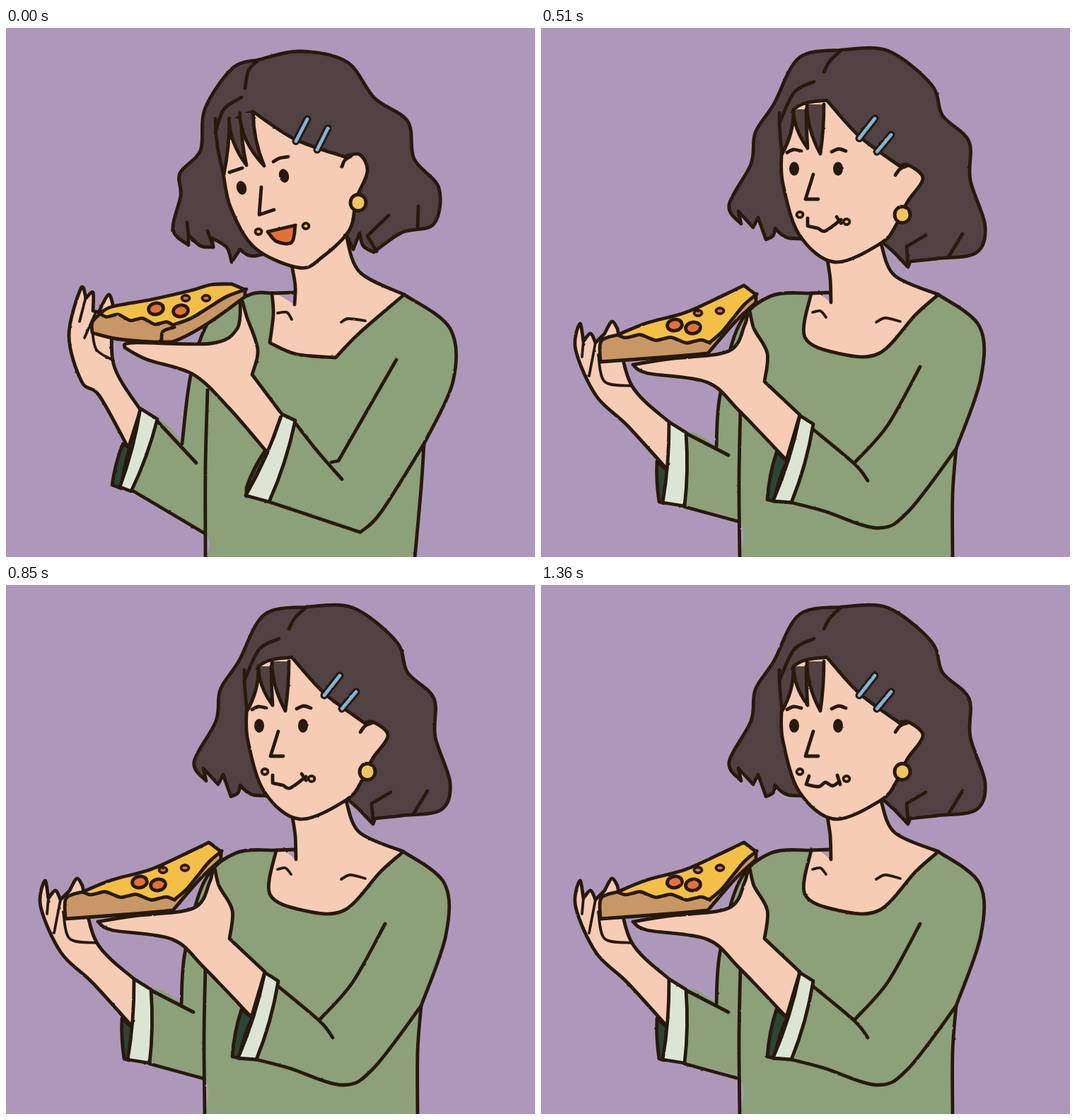
Recreate the animation shown at these times as an HTML page. Size 748 by 748 pixels, loop 1.53 s.

```html
<!DOCTYPE html>
<html lang="en">
<head>
<meta charset="utf-8">
<title>Pizza break</title>
<style>
  html, body { margin: 0; width: 100%; height: 100%; overflow: hidden; background: #ad98bb; }
  svg { display: block; width: 100vw; height: 100vh; }
  path, ellipse { fill: none; stroke: #27190c; stroke-width: 4.8; stroke-linecap: round; stroke-linejoin: round; }
  .bare { stroke: none; }
  .thin { stroke-width: 3.8; }
  .skin { fill: #f7ccb5; }
  .hair { fill: #514142; }
  .shirt { fill: #8ca07a; }
  .cuff { fill: #dce5d3; }
  .inside { fill: #2d4435; }
  .cheese { fill: #f3bf47; }
  .crust { fill: #c99766; }
  .meat { fill: #e4703b; }
  .gold { fill: #f2c460; }
  .eye { fill: #27190c; stroke: none; }
  .clip { stroke-width: 11; }
  .blue { stroke: #7fb5dc; stroke-width: 4.8; }
</style>
</head>
<body>
<svg viewBox="0 0 748 748" id="stage"><defs id="defs"></defs></svg>
<script>
const NS = 'http://www.w3.org/2000/svg';
const stage = document.getElementById('stage');
const defs = document.getElementById('defs');
const LOOP = 1530, BEATS = 9;

function add(parent, tag, attrs) {
  const node = document.createElementNS(NS, tag);
  for (const key in attrs) node.setAttribute(key, attrs[key]);
  return parent.appendChild(node);
}

// Smooth curve through points; "/" marks a corner.
function curve(text) {
  const runs = text.split('/').map(run => run.trim().split(/\s+/).map(p => p.split(',').map(Number)));
  let d = 'M' + runs[0][0], last = null;
  for (const run of runs) {
    const pts = last ? [last, ...run] : run;
    for (let i = 0; i + 1 < pts.length; i++) {
      const a = pts[i - 1] || pts[i], b = pts[i], c = pts[i + 1], e = pts[i + 2] || c;
      const out = b.map((v, k) => v + (c[k] - a[k]) / 6);
      const into = c.map((v, k) => v - (e[k] - b[k]) / 6);
      d += `C${out} ${into} ${c}`;
    }
    last = pts[pts.length - 1];
  }
  return d;
}

const reversed = pts => pts.split(' ').reverse().join(' ');
const shape = (g, cls, pts) => add(g, 'path', { class: cls, d: curve(pts) + 'Z' });
const lines = (g, list, cls = '') => list.forEach(pts => add(g, 'path', { class: cls, d: curve(pts) }));
const oval = (g, cls, [x, y], rx, ry = rx, turn = 0) =>
  add(g, 'ellipse', { class: cls, cx: x, cy: y, rx, ry, transform: `rotate(${turn} ${x} ${y})` });

// Rippling edge between two points.
function ripple([x1, y1], [x2, y2], bumps, size) {
  const steps = bumps * 4;
  return Array.from({ length: steps + 1 }, (_, i) => {
    const t = i / steps;
    return `${x1 + (x2 - x1) * t},${y1 + (y2 - y1) * t - size * Math.sin(t * bumps * 2 * Math.PI)}`;
  }).join(' ');
}

// Tapering lock of fringe hanging from (x, y) to its tip.
function lock(g, [x, y, width, tipX, tipY]) {
  const left = x - width / 2, right = x + width / 2, bend = (y + tipY) / 2;
  add(g, 'path', { class: 'hair', d: `M${left},${y}Q${left},${bend} ${tipX},${tipY}Q${right},${bend} ${right},${y}` });
}

// Band with bowed long sides, given its four corners clockwise.
function band(g, cls, [a, b, c, d], bow) {
  const side = (p, q) => `Q${(p[0] + q[0]) / 2 + bow},${(p[1] + q[1]) / 2 + bow / 2} ${q}`;
  add(g, 'path', { class: cls, d: `M${a}L${b}${side(b, c)}L${d}${side(d, a)}Z` });
}

// A group seen only on the beats marked 1.
function timed(parent, beats) {
  const name = 'b' + beats;
  if (!document.getElementById(name)) {
    const style = document.createElement('style');
    style.id = name;
    const stops = [...beats].map((on, i) => `${i * 100 / BEATS}%{opacity:${on}}`).join('');
    style.textContent = `@keyframes ${name}{${stops}100%{opacity:${beats[0]}}}`;
    document.head.append(style);
  }
  return add(parent, 'g', { style: `animation:${name} ${LOOP}ms step-end infinite` });
}

// Slightly ragged ink edges, with one seed per drawing.
function inked(beats, seed) {
  const f = add(defs, 'filter', {
    id: 'ink' + seed, filterUnits: 'userSpaceOnUse', x: 0, y: 0, width: 748, height: 760,
    'color-interpolation-filters': 'sRGB'
  });
  add(f, 'feTurbulence', { type: 'fractalNoise', baseFrequency: 0.2, seed, result: 'n' });
  add(f, 'feDisplacementMap', { in: 'SourceGraphic', in2: 'n', scale: 2, xChannelSelector: 'R', yChannelSelector: 'G' });
  return add(timed(stage, beats), 'g', { filter: `url(#ink${seed})` });
}

const leaning = {
  hair: '357,45 415,33 482,48 521,99 568,132 577,185 612,226 605,277 560,289 520,317 / 505,308 500,290 / 491,313 / 480,290 / 371,318 345,322 331,313 / 319,331 / 312,310 291,297 / 293,310 / 275,308 258,293 / 258,307 / 236,285 247,237 246,205 275,173 281,115 320,57 357,45',
  strands: ['256,275 258,293', '285,287 293,309', '541,265 511,294 / 524,316', '583,252 582,284', '357,45 343,60 338,85', '333,98 308,115 296,148'],
  neckL: '404,335 409,365 408,391',
  neckR: '481,293 500,345 563,377',
  neckline: '376,375 378,405 373,445 / 410,461 466,466 / 500,431 563,377',
  shoulderL: '249,588 262,487 290,410 345,377 376,375',
  shoulderR: '563,377 628,425 632,500 591,588',
  side: '591,588 587,650 578,750',
  elbow: '591,588 530,685 501,713 / 372,670',
  sleeveTop: '213,555 269,615',
  sleeveBottom: '177,653 280,714',
  folds: ['285,512 282,620 282,750', '552,469 470,612 / 460,614', '407,556 440,598 475,638'],
  collarbones: ['384,403 397,402 404,412', '474,416 484,411 508,414'],
  face: '349,118 408,157 478,182 / 500,179 511,203 495,242 486,285 447,324 415,339 352,311 318,255 307,205 / 318,138 349,118',
  locks: [[306, 128, 20, 308, 207], [324, 128, 17, 340, 194], [340, 120, 19, 365, 195]],
  features: ['316,204 334,198', '378,189 387,184 399,182', '361,225 358,264 / 379,257', '475,196 479,187 488,181'],
  clips: ['410,160 426,129', '440,172 455,142'],
  earring: [498, 247],
  eyes: [[333, 226], [393, 209]], tilt: -15,
  crumbs: [[357, 288], [424, 280]],
  backHand: '173,594 132,520 107,500 89,435 106,368 113,382 / 123,374 123,400 / 131,402 / 145,377 152,395 / 152,475 190,540',
  knuckles: ['113,380 104,415', '127,402 111,438', '122,428 128,455 152,470'],
  backCuff: [[190, 538], [214, 553], [177, 655], [161, 649]],
  backInside: [[165, 588], [175, 594], [163, 651], [150, 646]],
  frontHand: '168,452 180,445 290,446 327,425 332,385 341,410 356,455 348,490 / 390,546 / 370,601 / 315,537 265,490 200,469 168,452',
  frontCuff: [[390, 546], [409, 555], [372, 670], [339, 661]],
  frontInside: [[367, 597], [374, 604], [340, 662], [340, 650]],
  meats: [[212, 397], [247, 400], [254, 382], [283, 382]]
};

const upright = {
  hair: '425,31 490,32 552,80 568,124 605,160 607,215 628,280 615,318 560,326 522,330 / 519,338 / 500,318 / 480,300 / 368,298 345,295 331,283 / 328,294 318,299 / 307,268 / 300,282 / 279,259 / 283,277 / 266,250 297,192 303,148 329,108 365,42 425,31',
  strands: ['544,293 517,309 / 519,336', '596,291 576,324', '425,31 409,46 400,62', '386,76 358,91 337,135'],
  neckL: '405,328 409,355 410,388',
  neckR: '481,306 500,350 562,377',
  neckline: '382,375 373,437 420,460 478,460 530,405 562,377',
  shoulderL: '248,593 253,520 280,420 325,379 382,375',
  shoulderR: '562,377 620,422 622,495 587,595',
  side: '587,595 582,660 582,750',
  elbow: '587,595 520,683 476,707 400,683 354,671',
  sleeveTop: '205,573 265,604',
  sleeveBottom: '203,677 280,698',
  folds: ['282,538 280,640 281,750', '536,479 490,562 444,614', '383,566 443,616 462,640'],
  collarbones: ['384,402 395,400 403,409', '474,416 487,410 508,415'],
  face: '404,102 450,153 507,195 / 520,194 540,213 518,246 503,277 481,304 415,331 365,292 342,220 340,178 / 358,115 404,102',
  locks: [[347, 120, 20, 341, 178], [366, 115, 18, 377, 170], [388, 108, 24, 395, 178]],
  features: ['348,176 357,172 368,174', '411,175 421,171 431,174', '385,207 374,242 / 392,242', '501,208 508,199 518,195'],
  clips: ['450,156 472,128', '475,175 495,151'],
  earring: [511, 264],
  eyes: [[358, 199], [420, 199]], tilt: 0,
  crumbs: [[366, 264], [432, 274]],
  backHand: '180,626 122,562 78,520 49,455 55,418 60,443 / 70,432 77,445 / 90,432 / 100,415 108,425 / 128,505 182,558',
  knuckles: ['60,442 58,465', '77,445 68,492', '81,462 90,500 128,506'],
  backCuff: [[181, 557], [205, 572], [203, 676], [172, 671]],
  backInside: [[164, 613], [180, 627], [174, 672], [167, 670]],
  frontHand: '130,476 180,468 265,457 288,420 294,398 301,425 320,460 316,500 / 366,547 / 347,611 / 280,541 235,501 150,488 130,476',
  frontCuff: [[366, 548], [385, 560], [354, 671], [328, 669]],
  frontInside: [[333, 600], [348, 612], [330, 669], [320, 667]],
  meats: [[189, 420], [215, 424], [222, 403], [253, 400]]
};

function drawBody(g, p) {
  shape(g, 'hair', p.hair);
  shape(g, 'bare skin', `404,300 / ${p.neckL} / ${p.neckline} / ${reversed(p.neckR)}`);
  shape(g, 'bare shirt', `${p.shoulderL} / ${p.neckline} / ${p.shoulderR} / ${p.side} / 282,750 / ${reversed(p.sleeveBottom)} / ${p.sleeveTop}`);
  lines(g, [p.neckL, p.neckR, p.neckline, p.shoulderL, p.shoulderR, p.side, p.elbow, p.sleeveTop, p.sleeveBottom, ...p.folds]);
  lines(g, [p.neckline.split(' ')[0] + ' 409,374']);
  lines(g, p.collarbones, 'thin');
}

function drawHead(g, p) {
  shape(g, 'skin', p.face);
  p.locks.forEach(l => lock(g, l));
  lines(g, [...p.strands, ...p.features]);
  for (const c of p.clips) lines(g, [c], 'clip'), lines(g, [c], 'blue');
  oval(g, 'gold', p.earring, 11, 11.5);
  p.crumbs.forEach(at => oval(g, 'thin gold', at, 4.5, 4));
}

const drawEyes = (g, p) => p.eyes.forEach(at => oval(g, 'eye', at, 7, 9.8, p.tilt));

function drawBackArm(g, p) {
  shape(g, 'skin', p.backHand);
  band(g, 'inside', p.backInside, -3);
  band(g, 'cuff', p.backCuff, 5);
  lines(g, p.knuckles, 'thin');
}

function drawPizza(g, heel, corner, tip, back, under) {
  shape(g, 'crust', `${heel} / ${under} / ${tip}`);
  shape(g, 'cheese', `${heel} ${back} / ${tip} / ${ripple(tip, corner, 1, 3)} / ${ripple(corner, heel, 3, 3)}`);
}

function drawFront(g, p) {
  p.meats.forEach((at, i) => i < 2 ? oval(g, 'meat', at, 10.5, 8, -10) : oval(g, 'thin meat', at, 5.5, 4));
  shape(g, 'skin', p.frontHand);
  band(g, 'inside', p.frontInside, -4);
  band(g, 'cuff', p.frontCuff, 6);
}

function lean(beats, seed, openBeats, biteBeats) {
  const g = inked(beats, seed), p = leaning;
  drawBody(g, p);
  drawHead(g, p);
  drawEyes(g, p);
  drawBackArm(g, p);

  const heel = [133, 404], corner = [236, 420], front = '122,416 122,431 / 160,440 222,444 245,440 288,416';
  const open = timed(g, openBeats), bite = timed(g, biteBeats);
  shape(open, 'meat', '370,288 409,279 / 404,303 383,302 370,288');
  drawPizza(open, heel, corner, [338, 370], '150,394 205,384 262,371 290,363 319,362', `${front} 338,380`);
  drawPizza(bite, heel, corner, [397, 297], '150,394 205,384 262,368 300,359 345,345 375,323', `${front} 345,374 374,344`);
  lines(bite, ['378,303 394,299 408,290', '406,285 412,296']);
  lines(g, ['220,442 222,429 238,423']);
  drawFront(g, p);
}

function chew(beats, seed, mouth, eyeBeats, blinkBeats) {
  const g = inked(beats, seed), p = upright;
  drawBody(g, p);
  drawHead(g, p);
  drawEyes(timed(g, eyeBeats), p);
  const lids = p.eyes.map(([x, y]) => `${x - 9},${y - 5} ${x + 1},${y + 5} ${x + 12},${y - 4}`);
  lines(timed(g, blinkBeats), lids, 'thin');
  lines(g, mouth);
  drawBackArm(g, p);
  drawPizza(g, [108, 434], [238, 445], [304, 377], '150,417 205,402 260,377 287,364', '85,443 84,472 / 180,465 236,460 / 275,415 304,388');
  drawFront(g, p);
}

lean('101000000', 3, '100000000', '001000000');
lean('010000000', 8, '000000000', '010000000');
chew('000101010', 5, ['377,269 377,280 / 391,283 402,287 424,271', '418,267 424,276'], '000101010', '000000000');
chew('000010101', 11, ['379,270 375,282 / 393,285 402,279 412,284 422,278', '419,269 423,282'], '000010001', '000000100');
</script>
</body>
</html>
```
